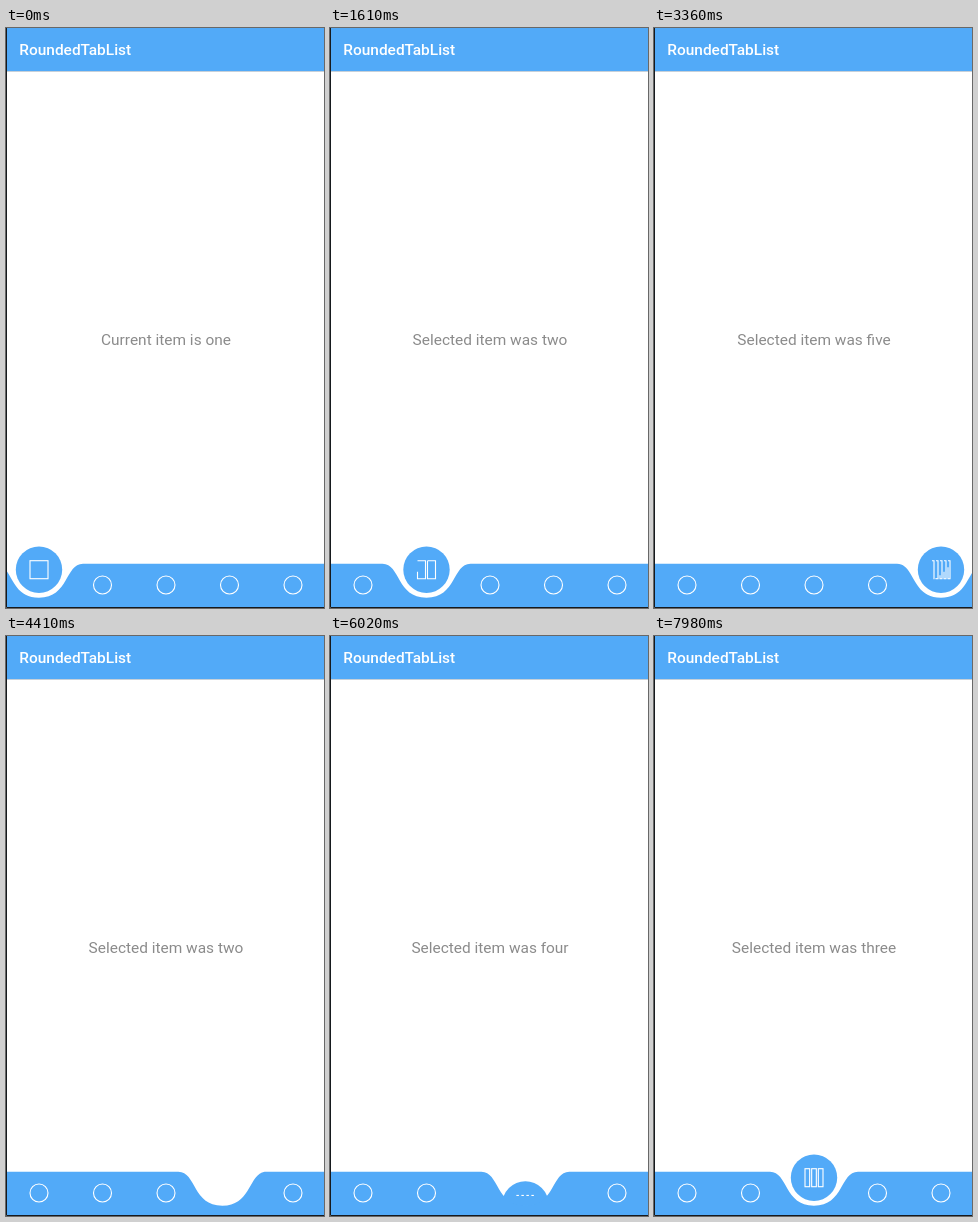
Write an HTML page that moves like this. It is 318 px wide and 580 px high and loops after 8000 ms.

```html
<!DOCTYPE html>
<html lang="en">
<head>
<meta charset="utf-8">
<style>
  html, body { margin: 0; width: 100%; height: 100%; overflow: hidden; background: #fff; }
  svg { display: block; width: 318px; height: 580px; }
  text { font: 15.45px Roboto, sans-serif; }
  .title { font-weight: 500; fill: #fff; }
  .message { fill: #8b8b8b; text-anchor: middle; }
  .blue { fill: #52aaf8; }
  .line { fill: none; stroke: #fff; stroke-width: 1.1; }
</style>
</head>
<body>
<svg id="stage" viewBox="0 0 318 580">
  <rect width="318" height="580" fill="#fff"/>
  <rect y="43" width="318" height="1" fill="#c6d0d9"/>
  <rect class="blue" width="318" height="43"/>
  <text class="title" x="13.3" y="27">RoundedTabList</text>
  <text class="message" id="message" x="160" y="316.8"></text>
  <g id="ball">
    <circle class="blue" r="23.2"/>
    <g id="icon"></g>
  </g>
  <path class="blue" id="bar"/>
  <g id="dots"></g>
  <path d="M.5 0V579.5H318" fill="none" stroke="#161a1e"/>
</svg>
<script>
const LOOP = 8000, SLIDE = 650, DROP = 120, RISE = 100, ICON_DELAY = 165;
const RISE_DISTANCE = 38, SUNK = 54, BALL_Y = 541.7;
const names = ['one', 'two', 'three', 'four', 'five'];
const moves = [
  { start: 950, from: 0, to: 1 },
  { start: 2557, from: 1, to: 4 },
  { start: 4170, from: 4, to: 1 },
  { start: 5515, from: 1, to: 3 },
  { start: 6788, from: 3, to: 2 }
];

const $ = id => document.getElementById(id);
const clamp = v => Math.max(0, Math.min(1, v));
const easeOut = v => 1 - (1 - clamp(v)) ** 3;
const itemX = i => 33 + 63.5 * i;

function add(parent, tag, attributes) {
  const node = document.createElementNS('http://www.w3.org/2000/svg', tag);
  for (const key in attributes) node.setAttribute(key, attributes[key]);
  return parent.appendChild(node);
}

const dots = names.map((_, i) =>
  add($('dots'), 'circle', { class: 'line', cx: itemX(i), cy: 557, r: 9 }));

// Each icon is a row of bars, as many as the item's number.
const icons = names.map((_, i) => {
  const group = add($('icon'), 'g', {});
  const count = i + 1, width = (18 - 2 * i) / count;
  const bars = Array.from({ length: count }, (_, k) => add(group, 'rect', {
    class: 'line', pathLength: 1, x: -9 + k * (width + 2), y: -9, width, height: 18
  }));
  return { group, bars };
});

function showIcon(index, age) {
  icons.forEach((icon, i) => icon.group.setAttribute('display', i === index ? 'inline' : 'none'));
  const bars = icons[index].bars;
  bars.forEach((bar, k) => {
    // Bars further right close sooner.
    const duration = 600 - 330 * k / Math.max(1, bars.length - 1);
    const drawn = 0.06 + 0.94 * easeOut(age / duration);
    bar.setAttribute('stroke-dasharray', drawn >= 1 ? 'none' : `${drawn} 2`);
  });
}

function barPath(x) {
  return `M1 535.7H${x - 44}` +
    'c18 0 14 34 44 34' +
    'c30 0 26 -34 44 -34' +
    'H400V579H1Z';
}

function pose(t) {
  const move = moves.filter(m => m.start <= t).pop();
  if (!move) return { x: itemX(0), sink: 0, item: 0, iconAge: Infinity, text: 'Current item is one' };
  const from = itemX(move.from), to = itemX(move.to);
  const age = t - move.start;
  const riseAge = age - SLIDE * (1 - RISE_DISTANCE / Math.abs(to - from));
  const rising = riseAge >= 0;
  return {
    x: from + (to - from) * clamp(age / SLIDE),
    sink: SUNK * (rising ? 1 - clamp(riseAge / RISE) : clamp(age / DROP)),
    item: rising ? move.to : move.from,
    iconAge: rising ? riseAge - ICON_DELAY : Infinity,
    text: 'Selected item was ' + names[move.to]
  };
}

function draw() {
  const { x, sink, item, iconAge, text } = pose(performance.now() % LOOP);
  if ($('message').textContent !== text) $('message').textContent = text;
  $('bar').setAttribute('d', barPath(x));
  $('ball').setAttribute('transform', `translate(${x} ${BALL_Y + sink})`);
  $('ball').setAttribute('display', sink < SUNK ? 'inline' : 'none');
  showIcon(item, iconAge);
  dots.forEach((dot, i) =>
    dot.setAttribute('visibility', Math.abs(itemX(i) - x) < 45 ? 'hidden' : 'visible'));
  requestAnimationFrame(draw);
}
draw();
</script>
</body>
</html>
```
